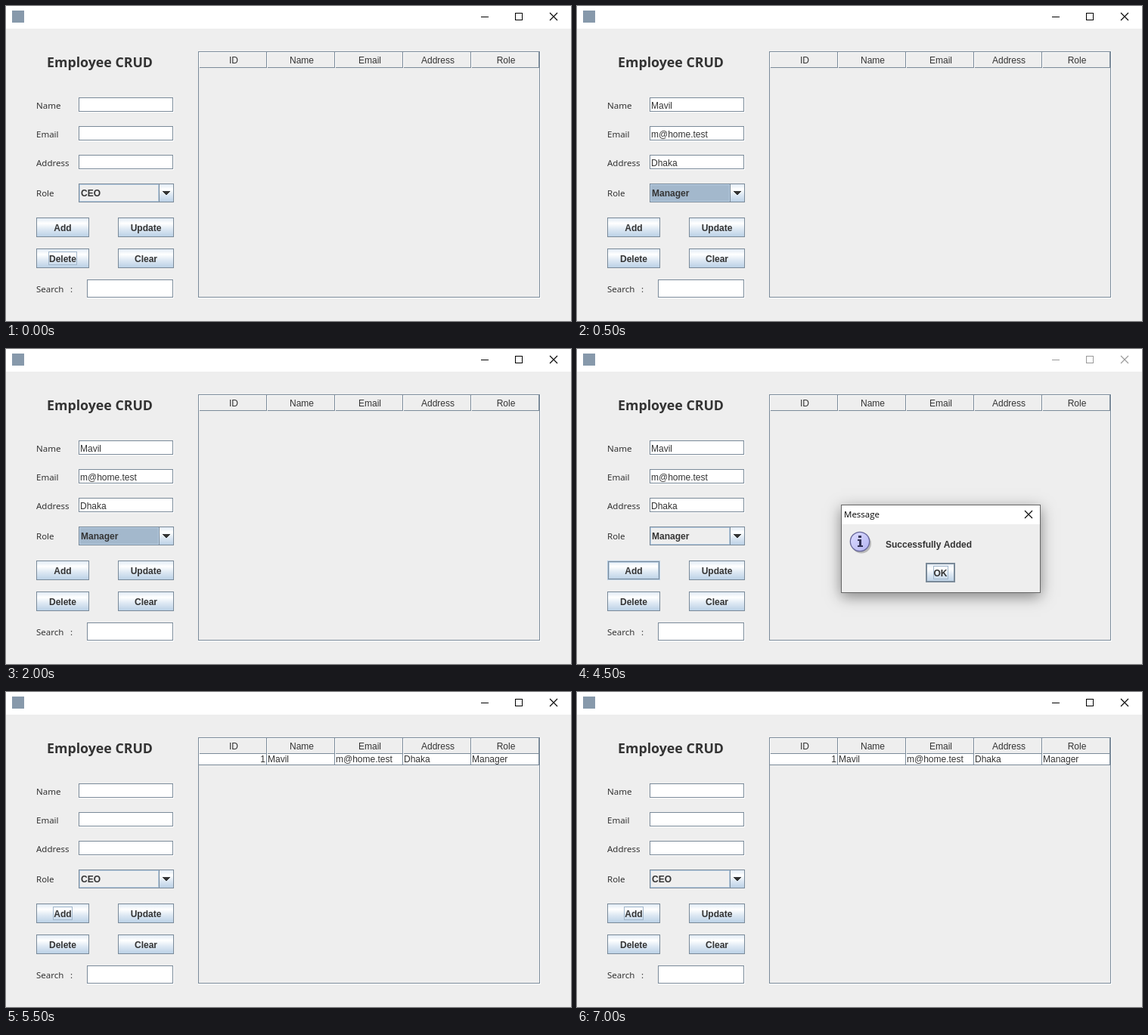
An HTML page with a canvas for the animation above (8 s loop, 747 by 417 pixels).

```html
<!DOCTYPE html>
<html lang="en">
<head>
<meta charset="utf-8">
<title>Employee form</title>
<style>
  html, body { margin: 0; width: 100%; height: 100%; overflow: hidden; background: #eee; }
  canvas { display: block; }
</style>
</head>
<body>
<canvas id="stage" width="747" height="417"></canvas>
<script>
const ctx = document.getElementById('stage').getContext('2d');

const INK = '#333', EDGE = '#7a8a99', PALE = '#b8cfe5', FOCUS = '#a3b8cc', PANEL = '#eee';
const SANS = '"Liberation Sans", Arial, sans-serif';
const PLAIN = `12px ${SANS}`;
const BOLD = `bold 12px ${SANS}`;
const LABEL = '11.5px "Noto Sans", sans-serif';
const CAPTION = '11.5px "Open Sans", sans-serif';
const HEADING = '"Noto Sans", "Open Sans", sans-serif';

const PERSON = { name: 'Mavil', email: 'm@home.test', address: 'Dhaka', role: 'Manager' };
const BLANK = { name: '', email: '', address: '', role: 'CEO' };
const COLUMNS = ['ID', 'Name', 'Email', 'Address', 'Role'];
const LOOP = 8000;
const STATES = [
  { from: 0, form: BLANK, focus: 'Delete' },
  { from: 500, form: PERSON, focus: 'Role' },
  { from: 3000, form: PERSON, hover: 'Add', dialog: true },
  { from: 5500, form: BLANK, focus: 'Add', saved: true }
];

function fill(x, y, w, h, color) {
  ctx.fillStyle = color;
  ctx.fillRect(x, y, w, h);
}

function frame(x, y, w, h, color) {
  ctx.strokeStyle = color;
  ctx.lineWidth = 1;
  ctx.strokeRect(x + 0.5, y + 0.5, w - 1, h - 1);
}

function text(str, x, y, font = PLAIN, align = 'left', color = INK) {
  ctx.font = font;
  ctx.textAlign = align;
  ctx.fillStyle = color;
  ctx.fillText(str, x, y);
}

function gloss(x, y, w, h) {
  const g = ctx.createLinearGradient(0, y, 0, y + h);
  g.addColorStop(0, '#dde8f3');
  g.addColorStop(0.3, '#fff');
  g.addColorStop(0.6, '#dde8f3');
  g.addColorStop(1, PALE);
  fill(x, y, w, h, g);
}

// Sunken box: dark outline with a white edge outside right and bottom
function sunken(x, y, w, h, color) {
  fill(x, y, w, h, '#fff');
  fill(x, y, w - 1, h - 1, color);
  frame(x, y, w - 1, h - 1, EDGE);
}

function field(x, y, w, h, value = '') {
  sunken(x, y, w, h, '#fff');
  text(value, x + 2, y + 15);
}

function cross(x, y, color) {
  ctx.strokeStyle = color;
  ctx.lineWidth = 1.1;
  ctx.beginPath();
  ctx.moveTo(x, y);
  ctx.lineTo(x + 10, y + 10);
  ctx.moveTo(x + 10, y);
  ctx.lineTo(x, y + 10);
  ctx.stroke();
}

function button(label, x, y, w, h, state) {
  gloss(x, y, w, h);
  frame(x, y, w, h, EDGE);
  if (state.hover === label) {
    frame(x, y, w, h, PALE);
    frame(x + 1, y + 1, w - 2, h - 2, EDGE);
    frame(x + 2, y + 2, w - 4, h - 4, PALE);
  }
  const mid = x + w / 2;
  text(label, mid, y + 18, BOLD, 'center');
  if (state.focus === label) {
    const half = Math.round(ctx.measureText(label).width / 2) + 1;
    frame(Math.round(mid) - half, y + 4, half * 2, 18, FOCUS);
  }
}

function comboBox(x, y, w, h, value, focused) {
  fill(x, y, w, h, focused ? FOCUS : PANEL);
  frame(x + 1, y + 1, w - 21, h - 2, PALE);
  gloss(x + w - 20, y, 20, h);
  frame(x, y, w, h, EDGE);
  frame(x + w - 20, y, 20, h, EDGE);
  for (let i = 0; i < 5; i++) fill(x + 111 + i, y + 10 + i, 10 - 2 * i, 1, INK);
  text(value, x + 3, y + 17, BOLD);
}

function titleBar(active) {
  const color = active ? '#000' : '#999';
  fill(0, 0, 747, 30, '#fff');
  fill(8, 6, 16, 16, '#8799ab');
  fill(628, 14, 10, 1, color);
  frame(673, 9, 10, 10, color);
  cross(719, 9, color);
}

function heading() {
  const font = size => `bold extra-condensed ${size}px ${HEADING}`;
  ctx.font = font(20);
  const size = Math.min(23, 20 * 140 / ctx.measureText('Employee CRUD').width);
  text('Employee CRUD', 124, 81, font(size), 'center');
}

function table(saved) {
  sunken(254, 60, 453, 327, PANEL);
  COLUMNS.forEach((name, i) => {
    const x = 255 + 90 * i;
    fill(x, 61, 89, 1, '#fff');
    fill(x, 61, 1, 20, '#fff');
    fill(x + 89, 61, 1, 21, EDGE);
    fill(x + 1, 81, 89, 1, EDGE);
    text(name, x + 46, 76, PLAIN, 'center');
  });
  if (!saved) return;
  const { name, email, address, role } = PERSON;
  fill(255, 82, 450, 15, '#fff');
  fill(255, 96, 450, 1, EDGE);
  ['1', name, email, address, role].forEach((value, i) => {
    const x = 255 + 90 * i;
    fill(x + 89, 82, 1, 15, EDGE);
    text(value, i ? x + 1 : x + 88, 93, PLAIN, i ? 'left' : 'right');
  });
}

function disc(x, y, r, color) {
  ctx.fillStyle = color;
  ctx.beginPath();
  ctx.arc(x, y, r, 0, Math.PI * 2);
  ctx.fill();
}

function infoIcon(x, y) {
  disc(x + 2, y + 2.5, 13, 'rgba(0,0,0,.22)');
  disc(x, y, 13.3, '#666699');
  const g = ctx.createLinearGradient(x - 9, y - 10, x + 9, y + 10);
  g.addColorStop(0, '#d8d8ff');
  g.addColorStop(1, '#b8b8f2');
  disc(x, y, 12, g);
  const ink = '#333355';
  fill(x - 2, y - 8, 4, 3, ink);
  fill(x - 3, y - 3, 5, 2, ink);
  fill(x - 1, y - 3, 3, 10, ink);
  fill(x - 3, y + 5, 7, 2, ink);
}

function dialog() {
  ctx.save();
  ctx.shadowColor = 'rgba(0,0,0,.45)';
  ctx.shadowBlur = 18;
  ctx.shadowOffsetY = 5;
  fill(349, 206, 264, 117, PANEL);
  ctx.restore();
  fill(350, 207, 262, 25, '#fff');
  frame(349, 206, 264, 117, '#666');
  text('Message', 353, 223, CAPTION, 'left', '#000');
  cross(592, 214, '#000');
  infoIcon(374, 255);
  text('Successfully Added', 408, 263, BOLD);
  button('OK', 461, 283, 39, 26, { focus: 'OK' });
  frame(462, 284, 37, 24, EDGE);
}

function draw(state) {
  const { form } = state;
  fill(0, 0, 747, 417, PANEL);
  titleBar(!state.dialog);
  heading();
  ['Name', 'Email', 'Address'].forEach((label, i) => {
    const y = 121 + 38 * i;
    text(label, 40, y + 15, LABEL);
    field(96, y, 126, 20, form[label.toLowerCase()]);
  });
  text('Role', 40, 252, LABEL);
  comboBox(96, 235, 126, 25, form.role, state.focus === 'Role');
  button('Add', 40, 280, 70, 26, state);
  button('Update', 148, 280, 74, 26, state);
  button('Delete', 40, 321, 70, 26, state);
  button('Clear', 148, 321, 74, 26, state);
  text('Search', 40, 379, LABEL);
  text(':', 85, 379, LABEL);
  field(107, 362, 115, 25);
  table(state.saved);
  if (state.dialog) dialog();
}

function tick() {
  const t = performance.now() % LOOP;
  draw(STATES.filter(s => s.from <= t).pop());
  requestAnimationFrame(tick);
}
tick();
</script>
</body>
</html>
```
